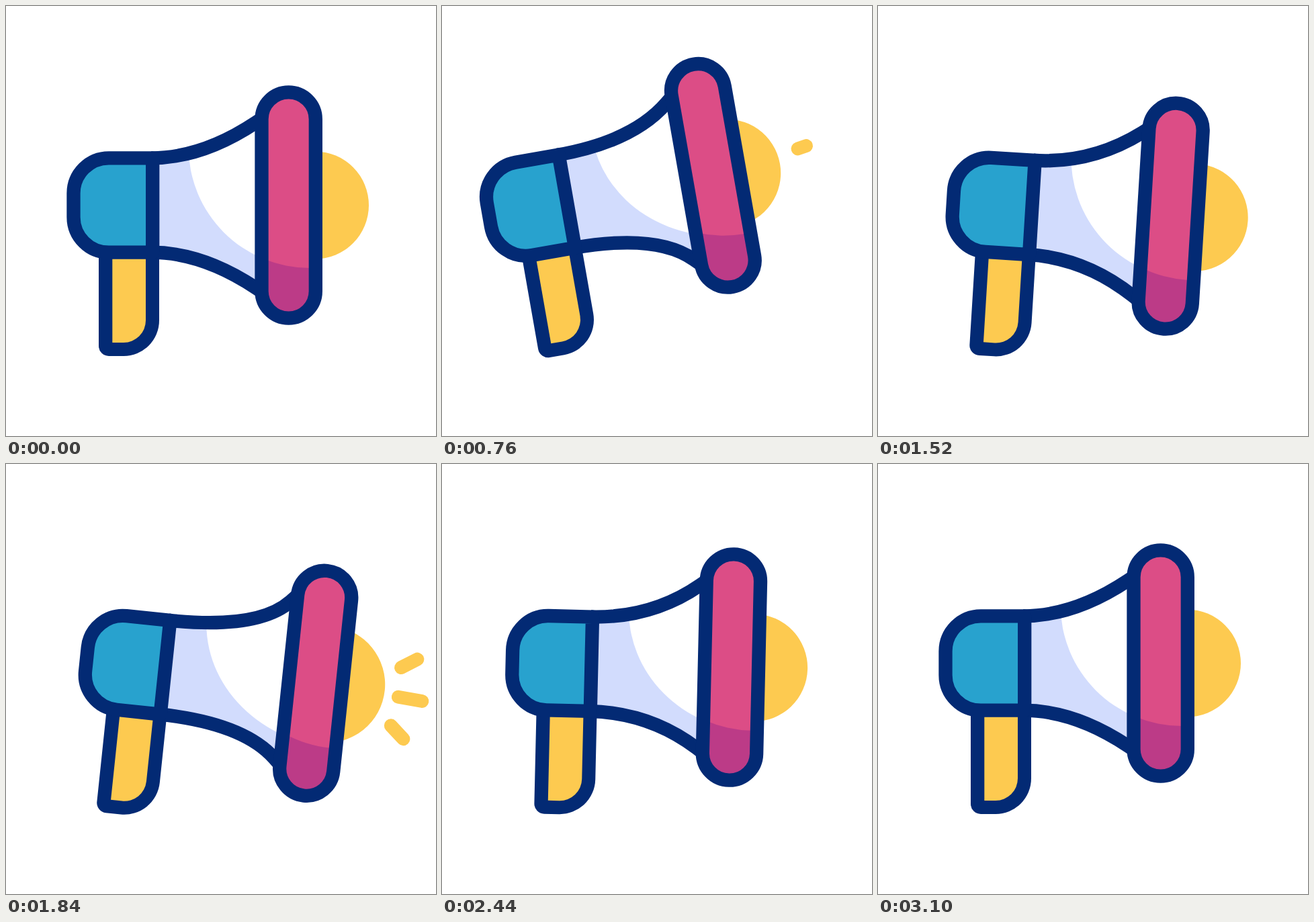
These frames come from a looping animation (640 px wide and 640 px high, 3160 ms). An HTML page:

```html
<!DOCTYPE html>
<html lang="en">
<head>
<meta charset="utf-8">
<title>Megaphone</title>
<style>
  html, body { margin: 0; width: 100%; height: 100%; overflow: hidden; background: #fff; }
  svg { display: block; width: 100vw; height: 100vh; }
  .line { fill: none; stroke: #032a74; stroke-width: 20.3; }
  .ray { stroke: #fdca50; stroke-width: 20; stroke-linecap: round; }
</style>
</head>
<body>
<svg viewBox="0 0 640 640">
  <defs>
    <clipPath id="hornClip"><path id="hornShape"/></clipPath>
    <clipPath id="bellClip"><rect x="385" y="133" width="71" height="327" rx="35.5"/></clipPath>
  </defs>
  <g id="all">
    <circle id="ball" cx="460" cy="296.5" r="80" fill="#fdca50"/>
    <g id="rays"></g>

    <path fill="#032a74" d="M138 367V506a15 15 0 0 0 15 15H175a53 53 0 0 0 53-53V367z"/>
    <path fill="#fdca50" d="M158.3 372V501H175a33 33 0 0 0 33-33V372z"/>

    <g clip-path="url(#hornClip)">
      <rect x="200" y="100" width="240" height="400" fill="#d2dcfd"/>
      <ellipse id="shine" cy="209.6" ry="180.4" fill="#fff"/>
    </g>
    <path id="hornTop" class="line"/>
    <path id="hornLow" class="line"/>

    <path class="line" style="fill:#28a2ce" stroke-linejoin="round"
      d="M218.2 226.3H153a52.5 52.5 0 0 0-52.5 52.5v35.4a52.5 52.5 0 0 0 52.5 52.5H218.2z"/>

    <g id="bell">
      <g clip-path="url(#bellClip)">
        <rect x="380" y="120" width="82" height="350" fill="#bc3b87"/>
        <circle cx="452" cy="209.6" r="180.4" fill="#dc4d86"/>
      </g>
      <rect class="line" x="380.5" y="128.3" width="80.3" height="336.4" rx="40.15"/>
    </g>
  </g>
</svg>
<script>
const LOOP = 3160, MID = 296.5;
const $ = id => document.getElementById(id);
const clamp = v => Math.min(1, Math.max(0, v));
const span = (t, a, b) => clamp((t - a) / (b - a));
const ease = u => (1 - Math.cos(Math.PI * u)) / 2;
const set = (el, attrs) => { for (const k in attrs) el.setAttribute(k, attrs[k]); };

// start, end, change of tilt in degrees
const tilts = [[240, 780, -10], [1090, 1670, 16], [2000, 2640, -6]];
// start of each shout, extra turn of its rays
const shouts = [[430, -9], [1390, 4], [2280, 0]];
// rays from the ball's centre: x, y, angle, length, delay
const rays = [[104.5, -43.8, -37, 27.5, 22], [108, 0, 0, 36, 0], [104.5, 43.8, 37, 27.5, 22]];

const rayEls = rays.map(([x, y, a]) => {
  const el = document.createElementNS('http://www.w3.org/2000/svg', 'line');
  set(el, { class: 'ray', transform: `translate(${460 + x} ${MID + y}) rotate(${a})` });
  return $('rays').appendChild(el);
});

const bump = (t, a, b, c, d) => ease(span(t, a, b)) - ease(span(t, c, d));

function drawRays(age) {
  rays.forEach(([, , , len, delay], i) => {
    const grow = 1 - (1 - span(age, 310 + delay, 460 + delay)) ** 3;
    const gone = ease(span(age, 480, 625));
    const from = len * (0.16 * (1 - grow) + gone) + 4 * gone;
    const to = len * (0.16 + 0.84 * grow) + 4 * gone;
    set(rayEls[i], {
      x1: from, x2: to,
      visibility: grow > 0 && gone < 1 ? 'visible' : 'hidden'
    });
  });
}

// points of one horn edge; side is -1 for the top, 1 for the bottom
function hornEdge(side, push, tilt) {
  const x = 371 + push, rise = 52.3 - 0.23 * push;
  const bend = 292 + push * (2.4 - 0.03 * side * tilt);
  const k = 12 / Math.hypot(x - bend, rise);
  const y = d => MID + side * (70.2 + d);
  return {
    start: `216 ${y(0)}`,
    bend: `${bend} ${y(0)}`,
    end: `${x} ${y(rise)}`,
    tip: `${x + (x - bend) * k} ${y(rise * (1 + k))}`
  };
}

function drawHorn(push, tilt) {
  const top = hornEdge(-1, push, tilt), low = hornEdge(1, push, tilt);
  const out = e => `M${e.start}Q${e.bend} ${e.end}L${e.tip}`;
  set($('hornTop'), { d: out(top) });
  set($('hornLow'), { d: out(low) });
  set($('hornShape'), { d: `${out(top)}L${low.tip}L${low.end}Q${low.bend} ${low.start}z` });
  set($('shine'), { cx: 452 + push, rx: 180.4 + push });
}

function draw(t) {
  const tilt = tilts.reduce((sum, [a, b, d]) => sum + d * ease(span(t, a, b)), 0);
  const [start, turn] = shouts.filter(s => t >= s[0]).pop() || shouts[0];
  const age = t - start;
  const push = 22.5 * bump(age, 0, 460, 460, 760);

  set($('all'), { transform: `rotate(${tilt} 168 479)` });
  set($('bell'), { transform: `translate(${push} 0)` });
  set($('ball'), { r: 80 + 10 * bump(age, 310, 540, 540, 790) });
  set($('rays'), { transform: `rotate(${turn} 460 ${MID})` });
  drawHorn(push, tilt);
  drawRays(age);
}

function tick() {
  draw(performance.now() % LOOP);
  requestAnimationFrame(tick);
}
tick();
</script>
</body>
</html>
```
